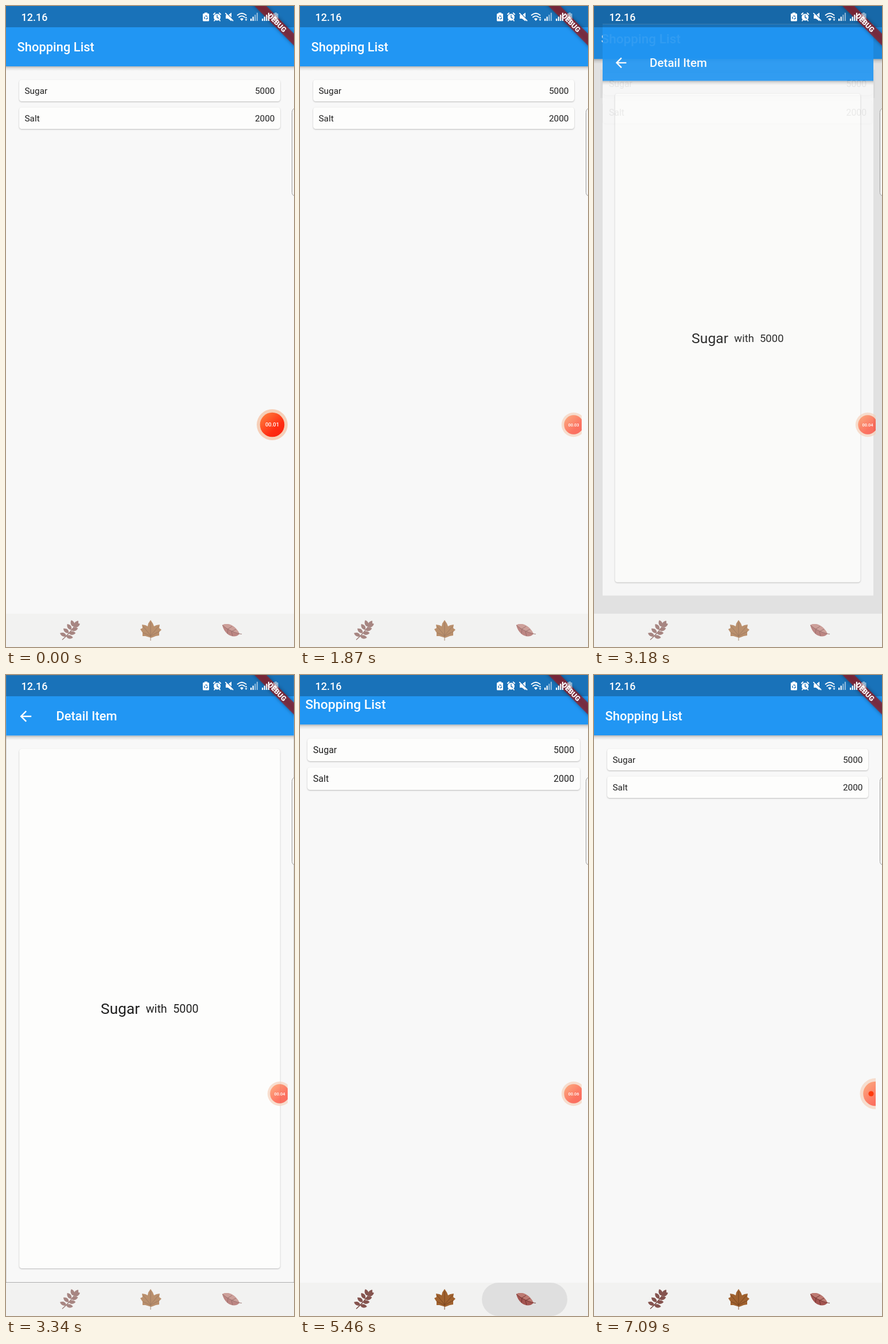
These frames come from a looping animation (502 by 1116 pixels, 7250 ms). An HTML page:

```html
<!DOCTYPE html>
<html lang="en">
<head>
<meta charset="utf-8">
<title>Shopping List</title>
<style>
  html, body { margin: 0; width: 100%; height: 100%; overflow: hidden; background: #f8f8f8; }
  svg { display: block; width: 502px; height: 1116px; font-family: Roboto, sans-serif; }
  .title { font-size: 21.93px; font-weight: 500; fill: #fff; }
  .item { font-size: 15.35px; fill: #1f1f1f; }
  .mid { font-size: 19.73px; fill: #1f1f1f; }
  .big { font-size: 26.3px; fill: #1f1f1f; }
  .end { text-anchor: end; }
  .center { text-anchor: middle; }
  .card { fill: #fdfdfc; filter: drop-shadow(0 1px 1px rgba(0, 0, 0, .25)); }
  .line { fill: none; stroke: #fff; stroke-width: 1.8; stroke-linecap: round; }
  .cut { fill: none; stroke: #1a70b8; stroke-width: 1.4; }
  .vein { fill: none; stroke-width: .9; }
</style>
</head>
<body>
<svg viewBox="0 0 502 1116" xmlns="http://www.w3.org/2000/svg">
  <defs>
    <linearGradient id="shade" x2="0" y2="1">
      <stop stop-color="#000" stop-opacity=".27"/>
      <stop offset=".4" stop-color="#000" stop-opacity=".1"/>
      <stop offset="1" stop-color="#000" stop-opacity="0"/>
    </linearGradient>
    <linearGradient id="hot" x1=".1" y1=".1" x2=".85" y2=".9">
      <stop stop-color="#ff7a3c"/>
      <stop offset=".7" stop-color="#ff2d12"/>
      <stop offset="1" stop-color="#fb2410"/>
    </linearGradient>
    <clipPath id="screen"><rect width="491" height="1116"/></clipPath>
    <path id="leaflet" d="M0 0C2-4 8-5 12-1C8 4 3 4 0 0Z"/>
    <g id="page">
      <rect width="502" height="1058" fill="#f8f8f8"/>
      <rect y="105" width="502" height="8" fill="url(#shade)"/>
      <rect width="502" height="105" fill="#2196f3"/>
    </g>
  </defs>

  <g id="list">
    <use href="#page"/>
    <rect id="tapSugar" x="18" y="123" width="465" height="48" opacity="0"/>
    <rect id="tapSalt" x="18" y="171" width="465" height="48" opacity="0"/>
    <text class="title" x="19.5" y="79">Shopping List</text>
    <rect class="card" x="23" y="128.5" width="455" height="37.5" rx="4.5"/>
    <text class="item" x="32.5" y="152.5">Sugar</text>
    <text class="item end" x="468.5" y="152.5">5000</text>
    <rect class="card" x="23" y="176.5" width="455" height="37.5" rx="4.5"/>
    <text class="item" x="32.5" y="200.5">Salt</text>
    <text class="item end" x="468.5" y="200.5">2000</text>
  </g>

  <rect id="scrim" width="502" height="1058" opacity="0"/>

  <g id="detail" opacity="0">
    <use href="#page"/>
    <path d="M44 71.5H27M35 62.5L26 71.5L35 80.5" fill="none" stroke="#fff" stroke-width="2.5"/>
    <text class="title" x="87.3" y="79">Detail Item</text>
    <rect class="card" x="23" y="128.5" width="455" height="905" rx="4.5"/>
    <text class="big" x="165" y="590.5">Sugar</text>
    <text class="mid" x="243.8" y="588.2">with</text>
    <text class="mid" x="291.3" y="588.2">5000</text>
  </g>

  <rect width="502" height="37" fill="#000" opacity=".24"/>
  <g transform="translate(502 0) rotate(45)">
    <rect x="-60" y="34.1" width="120" height="14.6" fill="#951c24" fill-opacity=".76" style="filter:drop-shadow(0 0 3px rgba(0,0,0,.5))"/>
    <text class="center" y="45.8" font-size="12.4" font-weight="900" fill="#fff">DEBUG</text>
  </g>

  <g fill="#fff">
    <text x="26.5" y="25.5" font-size="18" font-weight="500">12.16</text>
    <path d="M346 11.5h5v1.5h1.5q1.5 0 1.5 1.5v10.5q0 1.5-1.5 1.5h-8q-1.5 0-1.5-1.5v-10.5q0-1.5 1.5-1.5h1.5z"/>
    <circle class="cut" cx="348.5" cy="20" r="2.7" stroke-dasharray="4 1.6"/>
    <circle cx="368" cy="19.5" r="6"/>
    <path class="cut" d="M368 15.5V20L371 21.5"/>
    <path class="line" d="M361.8 14.5L364.3 12.3M374.2 14.5L371.7 12.3M364 24.5L363 25.8M372 24.5L373 25.8"/>
    <path d="M383 16h4l6-4.5v15l-6-4.5h-4z"/>
    <path class="cut" d="M384.5 12.5L396.5 24.5"/>
    <path class="line" d="M382.8 12.8L395.5 25.5"/>
    <path class="line" d="M403.5 16Q411 9.5 418.5 16M406 19.5Q411 15.3 416 19.5"/>
    <path d="M408 22.5Q411 20 414 22.5L411 26ZM416.5 21.5l2-3l2 3zM416.5 23l2 3l2-3z"/>
    <g id="bars"></g>
    <path d="M468 11.5h4v1.5h1.5q1 0 1 1v11.5q0 1-1 1h-7q-1 0-1-1V14q0-1 1-1h1.5z" opacity=".5"/>
    <path d="M471 15L467.5 20.5H470L469 25L472.5 19.5H470Z"/>
  </g>

  <rect y="1058" width="502" height="58" fill="#f2f2f1"/>
  <rect id="pill" x="317" y="1058" width="149" height="58" rx="29" fill="#dfdfdf" opacity="0"/>
  <g id="leaves">
    <g id="sprig" fill="#85544f">
      <path d="M98 1103.5Q111 1092 121 1078" fill="none" stroke="#74463f" stroke-width="1.3"/>
    </g>
    <path fill="#a0622f" d="M252 1069L256 1075L258 1080L262 1078L268 1077L267 1083L271 1086L267 1090L267 1096L261 1097L253 1100L243 1097L238 1097L238 1091L234 1085L238 1083L237 1077L243 1078L247 1080L248 1075Z"/>
    <path class="vein" d="M252 1073V1105M252 1096L239 1080M252 1096L266 1080M252 1097L239 1091M252 1097L267 1089" stroke="#75411d"/>
    <path fill="#a35450" d="M377 1078C383 1074 398 1075 407 1093C400 1102 382 1098 377 1078Z"/>
    <path fill="#bd7a72" d="M377 1078C383 1074 398 1075 407 1093Q390 1089 377 1078Z"/>
    <path class="vein" d="M377 1078Q390 1089 407 1093L411 1093.5M386 1085L394 1080M393 1089L401 1085M387 1085L386 1093M393 1089L395 1097" stroke="#6d302c"/>
  </g>

  <path d="M503 178.5q-4.500 1-4.500 7v139q0 5 4.500 6" fill="#f5f5f5" stroke="#9c9c9c"/>

  <g clip-path="url(#screen)">
    <g id="rec">
      <g id="disc">
        <circle r="27" fill="#f6cfb8"/>
        <circle r="21.3" fill="url(#hot)"/>
      </g>
      <text id="label" class="center" y="3.3" font-size="9.5" font-weight="500" fill="#fff">00.01</text>
      <circle id="dot" r="4.6" fill="#ff3a0c" opacity="0"/>
    </g>
  </g>
</svg>
<script>
const LOOP = 7250, TICK = LOOP / 89;
const PUSH = 3105, POP = 5391, ROUTE = 300;
const $ = id => document.getElementById(id);
const set = (id, name, value) => $(id).setAttribute(name, value);
const fade = (id, value) => set(id, 'opacity', value);
const ramp = (t, from, to) => Math.min(1, Math.max(0, (t - from) / (to - from)));
const mix = (a, b, p) => a + (b - a) * p;

function bezier(x1, y1, x2, y2) {
  const at = (a, b, s) => 3 * a * s * (1 - s) ** 2 + 3 * b * s * s * (1 - s) + s ** 3;
  return x => {
    let lo = 0, hi = 1;
    for (let i = 0; i < 24; i++) {
      const s = (lo + hi) / 2;
      if (at(x1, x2, s) < x) lo = s; else hi = s;
    }
    return at(y1, y2, lo);
  };
}

// Two-part emphasised curve used by the page zoom
const slowStart = bezier(.05, 0, .1333, .06), slowEnd = bezier(.2083, .82, .25, 1);
const zoom = p => p < 1 / 6 ? .4 * slowStart(p * 6) : .4 + .6 * slowEnd((p - 1 / 6) * 1.2);

const scalePage = (id, s) =>
  set(id, 'transform', `translate(251 529) scale(${s}) translate(-251 -529)`);

function drawPages(t) {
  const popping = t >= POP;
  const p = popping ? ramp(t, POP, POP + ROUTE) : ramp(t, PUSH, PUSH + ROUTE);
  const z = zoom(p);
  scalePage('list', popping ? mix(1.1, 1, z) : mix(1, 1.05, z));
  scalePage('detail', popping ? mix(1, .9, z) : mix(.85, 1, z));
  fade('detail', popping ? 1 - ramp(p, .0825, .2075) : ramp(p, .125, .25));
  fade('scrim', popping || p === 1 ? 0 : .6 * ramp(p, .2075, .4175));
  fade('tapSugar', t < POP ? .035 * ramp(t, 2770, 2930) : 0);
  fade('tapSalt', t > 6750 && t < 6840 ? .035 : 0);
}

function drawNav(t) {
  fade('leaves', mix(.68, 1, ramp(t, 4970, 5130)));
  fade('pill', ramp(t, 5050, 5220) * (1 - ramp(t, 5540, 5950)));
}

function drawRecorder(t) {
  const tuck = ramp(t, 977, 1222), rest = ramp(t, 6030, 6597);
  const x = mix(mix(464, 477, tuck), 490.5, rest);
  const s = mix(mix(1, .785, tuck), 1, rest);
  set('rec', 'transform', `translate(${x} 729) scale(${s})`);
  fade('disc', mix(1, .65, tuck));
  const seconds = 1 + [885, 1865, 2685, 3905, 4885, 5865].filter(at => t >= at).length;
  $('label').textContent = '00.0' + seconds;
  fade('label', 1 - ramp(rest, 0, .3));
  fade('dot', ramp(rest, .1, .4));
  set('dot', 'cx', -7.5 * rest);
}

function add(parent, tag, attrs) {
  const el = document.createElementNS('http://www.w3.org/2000/svg', tag);
  for (const name in attrs) el.setAttribute(name, attrs[name]);
  $(parent).append(el);
}

for (const [left, lit] of [[426, 2], [446, 4]])
  for (let i = 0; i < 4; i++) {
    const height = 4 + i * 3.4;
    add('bars', 'rect', { x: left + i * 3.6, y: 26 - height, width: 2.2, height, opacity: i < lit ? 1 : .5 });
  }

const leaflet = (x, y, turn) =>
  add('sprig', 'use', { href: '#leaflet', transform: `translate(${x} ${y}) rotate(${turn})` });
for (let i = 0; i < 4; i++) {
  const x = 105 + i * 4.3, y = 1097 - i * 5.5;
  leaflet(x, y, -150 + i * 15);
  leaflet(x, y, 18 - i * 12);
}
leaflet(119, 1080, -50);

// The picture advances in even ticks, as a screen recording does
function frame(now) {
  const t = Math.floor((now % LOOP + 8) / TICK) % 89 * TICK;
  drawPages(t);
  drawNav(t);
  drawRecorder(t);
}

let start;
function loop(now) {
  start ??= now;
  frame(now - start);
  requestAnimationFrame(loop);
}
frame(0);
requestAnimationFrame(loop);
</script>
</body>
</html>
```
